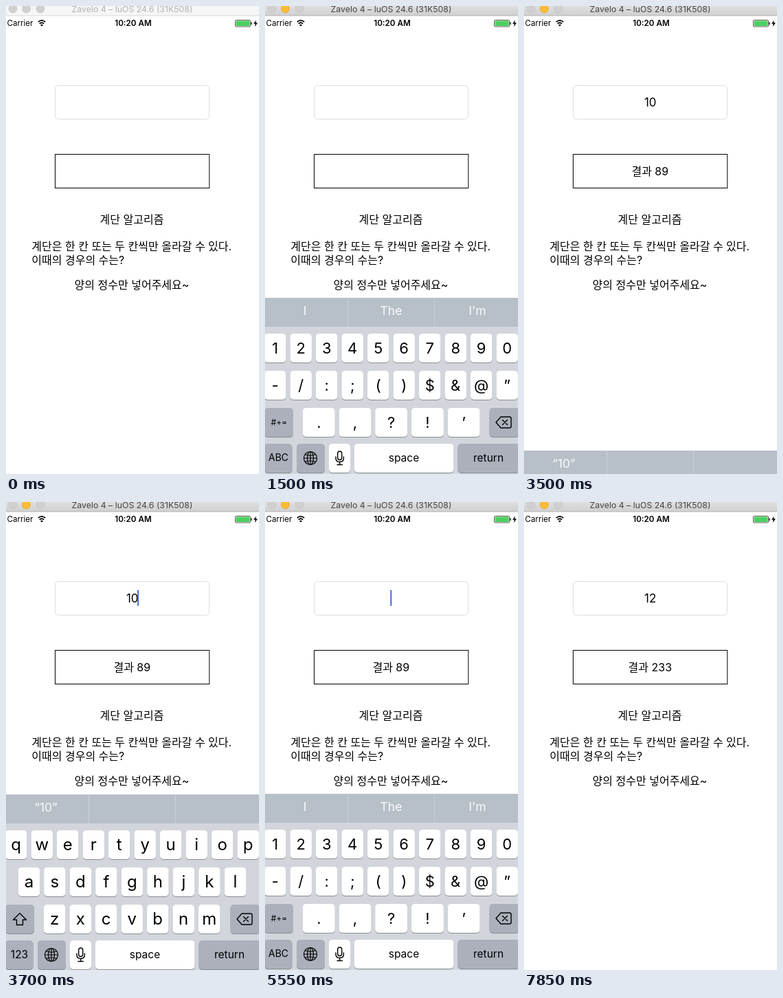
An HTML page that plays this animation: 368 by 680 pixels, repeating every 8 s.

```html
<!DOCTYPE html>
<html lang="ko">
<head>
<meta charset="utf-8">
<style>
html, body { margin: 0; width: 100%; height: 100%; overflow: hidden; background: #fff; }
svg { display: block; }
text { font-family: Inter, "Noto Sans CJK KR", "Noto Sans CJK", sans-serif; font-size: 16px; white-space: pre; }
.mid { text-anchor: middle; }
.line { fill: none; stroke: #000; stroke-width: 1.4; stroke-linecap: round; stroke-linejoin: round; }
</style>
</head>
<body>
<svg id="stage" width="368" height="680" viewBox="0 0 368 680"></svg>
<script>
const LOOP = 8000, KEYBOARD = 256;

// Each list holds [start time, value] pairs.
const typed = [[0, ''], [1800, '1'], [2150, '10'], [4150, '1'], [4450, ''], [5700, '1'], [6000, '12']];
const results = [[0, ''], [2750, '결과 89'], [6400, '결과 233']];
const modes = [[0, 'upper'], [1300, 'num'], [3450, 'lower'], [4450, 'upper'], [5200, 'num']];
const slides = [[0, false], [639, true], [2750, false], [3483, true], [6400, false]];
const focus = [[0, false], [639, true], [2750, false], [3520, true], [6400, false]];
const active = [[0, false], [150, true]];

const current = (list, t) => list.filter(e => e[0] <= t).pop();

const text = (s, x, y, size = 16, attrs = '') =>
  `<text x="${x}" y="${y}" style="font-size:${size}px" ${attrs}>${s.replace('&', '&amp;')}</text>`;
const centred = (s, x, y, size, attrs = '') => text(s, x, y, size, 'class="mid" ' + attrs);
const rect = (x, y, w, h, fill, attrs = '') =>
  `<rect x="${x}" y="${y}" width="${w}" height="${h}" fill="${fill}" ${attrs}/>`;
const path = (d, attrs = 'class="line"') => `<path d="${d}" ${attrs}/>`;

const GREY = '#abb0bb';
const key = (x, y, w, fill = '#fff') =>
  rect(x, y + 1, w, 42, '#898c92', 'rx="5"') + rect(x, y, w, 42, fill, 'rx="5"');

function keyRow(chars, first, y, size, pitch = 37.5, w = 31.5) {
  return [...chars].map((c, i) => {
    const x = first + i * pitch;
    return key(x - w / 2, y, w) + centred(c, x, y + 29, size);
  }).join('');
}

function letters(rows, size, shiftOn) {
  return keyRow(rows[0], 14.7, 476, size) + keyRow(rows[1], 33.4, 530, size) +
    keyRow(rows[2], 70.7, 584, size) +
    key(-1, 584, 42, shiftOn ? '#fff' : GREY) +
    path('M20 596.5L29.5 606H24.5V613.5H15.5V606H10.5Z', `class="line" style="fill:${shiftOn ? '#000' : 'none'}"`) +
    centred('123', 19.5, 662, 15.5);
}

const numbers = keyRow('1234567890', 14.7, 476, 22) + keyRow('-/:;()$&@”', 14.7, 530, 22) +
  keyRow('.,?!’', 78.3, 584, 22, 52.7, 47) +
  key(-1, 584, 42, GREY) + centred('#+=', 20.5, 609, 12) + centred('ABC', 19.5, 661, 14);

const icons = {
  erase: path('M343 597H355.5Q358 597 358 599.5V610.5Q358 613 355.5 613H343L336 605Z') +
    path('M345.5 601.5L352.5 608.5M352.5 601.5L345.5 608.5'),
  globe: `<g class="line" style="stroke-width:1.2"><circle cx="66" cy="657" r="9.5"/>
    <ellipse cx="66" cy="657" rx="4.5" ry="9.5"/>
    <path d="M66 647.5V666.5M56.5 657H75.5M58.5 651.5Q66 655 73.5 651.5M58.5 662.5Q66 659 73.5 662.5"/></g>`,
  mic: rect(105.7, 647, 6, 12.5, 'none', 'rx="3" class="line"') +
    path('M103 655V657Q103 662.5 108.7 662.5T114.4 657V655M108.7 662.5V666.5M105 666.5H112.4'),
  wifi: path('M46.8 23.2Q52 18.6 57.2 23.2M48.8 25.6Q52 22.8 55.2 25.6', 'class="line" style="stroke-width:1.8;stroke-linecap:butt"') +
    path('M52 29.6L49.9 27.4Q52 25.9 54.1 27.4Z', '')
};

const keyboard = `<g id="keyboard">` +
  rect(0, 424, 368, 260, '#d2d5dc') + rect(0, 424, 368, 42, '#b7bfc7') +
  rect(120, 424, 1, 42, '#cbd1d8') + rect(246, 424, 1, 42, '#cbd1d8') +
  [58, 183.5, 309].map((x, i) => centred('', x, 449, 17.5, `id="hint${i}" fill="#fafbfc"`)).join('') +
  key(-1, 636, 40.5, GREY) + key(46, 636, 41, GREY) + key(93, 636, 31, '#fff') +
  key(130, 636, 144.5) + key(280.5, 636, 90, GREY) + key(326.5, 584, 43, GREY) +
  icons.erase + icons.globe + icons.mic +
  centred('space', 202, 662, 15.5) + centred('return', 325, 662, 15.5) +
  `<g id="upper">${letters(['QWERTYUIOP', 'ASDFGHJKL', 'ZXCVBNM'], 22, true)}</g>` +
  `<g id="lower">${letters(['qwertyuiop', 'asdfghjkl', 'zxcvbnm'], 24, false)}</g>` +
  `<g id="num">${numbers}</g></g>`;

document.getElementById('stage').innerHTML =
  `<defs><linearGradient id="bar" x2="0" y2="1"><stop stop-color="#e0dfe0"/><stop offset="1" stop-color="#d1d0d1"/></linearGradient></defs>` +
  rect(0, 0, 368, 680, '#fff') +
  rect(0, 0, 368, 14, '#f6f6f6', 'id="titleBar"') + rect(0, 13.5, 368, 1, '#d0d0d0', 'id="titleEdge"') +
  [10, 29.5, 50].map((x, i) => `<circle id="dot${i}" cx="${x}" cy="4" r="6" fill="#d0d0d0" stroke="#c0c0c0" stroke-width=".7"/>`).join('') +
  centred('Zavelo 4 – luOS 24.6 (31K508)', 183.5, 8.5, 12.3, 'id="title"') +
  text('Carrier', 1.5, 29, 11.6) + icons.wifi + centred('10:20 AM', 185, 29, 11.7, 'font-weight="600"') +
  rect(333.5, 20.5, 22, 9.5, '#fff', 'stroke="#333" stroke-width=".8" rx="1"') +
  rect(334.5, 21.5, 20, 7.5, '#4cd05f') + rect(356.3, 23.5, 1.4, 3.5, '#222') +
  path('M364 20.5L360 25.8H362.6L361.8 30L366 24.4H363.3Z', '') +
  rect(71.5, 115.5, 224, 49, '#fff', 'rx="5" stroke="#dedede"') +
  rect(71.5, 215.5, 224.3, 49, '#fff', 'stroke="#000"') +
  centred('', 183.7, 146, 17, 'id="field"') + rect(0, 128, 2, 23, '#4669db', 'id="caret"') +
  centred('', 183.3, 246, 16, 'id="result"') +
  centred('계단 알고리즘', 183, 316) +
  text('계단은 한 칸 또는 두 칸씩만 올라갈 수 있다.', 37.3, 355) + text('이때의 경우의 수는?', 37.3, 375) +
  centred('양의 정수만 넣어주세요~', 183, 411) +
  keyboard;

const $ = id => document.getElementById(id);
const show = (id, on) => $(id).setAttribute('visibility', on ? 'visible' : 'hidden');
const put = (id, s) => { if ($(id).textContent !== s) $(id).textContent = s; };

// Critically damped spring, from 1 down to 0.
const spring = ms => { const x = ms * 0.035; return (1 + x) * Math.exp(-x); };

function draw(t) {
  const on = current(active, t)[1];
  $('titleBar').setAttribute('fill', on ? 'url(#bar)' : '#f6f6f6');
  $('titleEdge').setAttribute('fill', on ? '#b5b4b5' : '#dcdcdc');
  $('title').setAttribute('fill', on ? '#444' : '#b2b2b2');
  $('dot1').setAttribute('fill', on ? '#fdbc33' : '#d0d0d0');
  $('dot1').setAttribute('stroke', on ? '#e0a22c' : '#c0c0c0');

  const [editTime, value] = current(typed, t);
  put('field', value);
  put('result', current(results, t)[1]);
  (value ? [`“${value}”`, '', ''] : ['I', 'The', "I'm"]).forEach((s, i) => put('hint' + i, s));

  const [focusTime, focused] = current(focus, t);
  show('caret', focused && (t - Math.max(editTime, focusTime)) % 1000 < 500);
  $('caret').setAttribute('x', 182.3 + $('field').getComputedTextLength() / 2);

  const mode = current(modes, t)[1];
  for (const id of ['upper', 'lower', 'num']) show(id, id === mode);

  const [slideTime, up] = current(slides, t);
  const left = slideTime ? spring(t - slideTime) : 0;
  const shift = Math.round(KEYBOARD * (up ? left : 1 - left));
  $('keyboard').setAttribute('transform', `translate(0 ${shift})`);
}

const start = performance.now();
function tick() {
  draw((performance.now() - start) % LOOP);
  requestAnimationFrame(tick);
}
tick();
</script>
</body>
</html>
```
